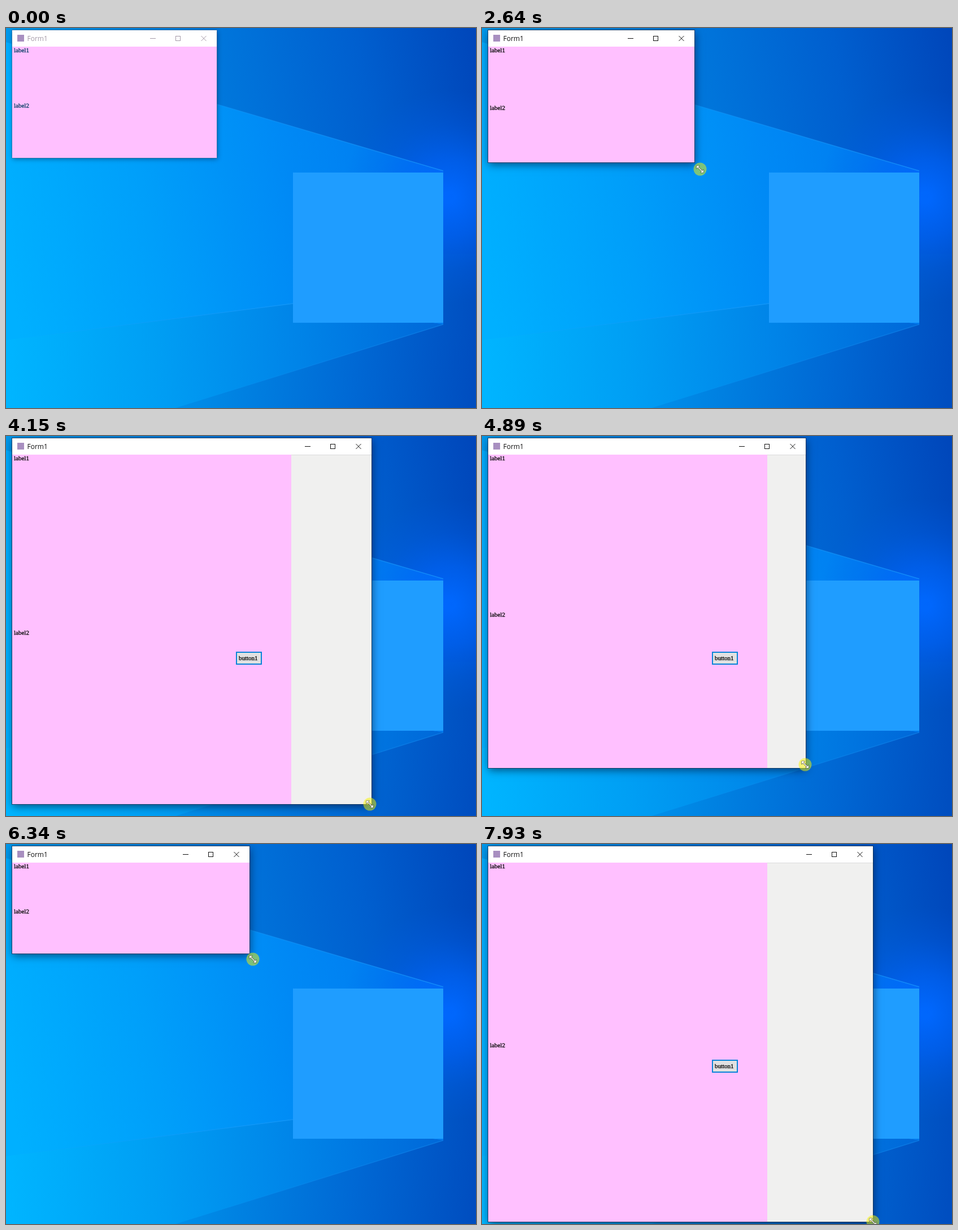
Animation, 832 px wide and 673 px high, one loop 8000 ms. Source, as an HTML page with a canvas:

```html
<!DOCTYPE html>
<html lang="en">
<head>
<meta charset="utf-8">
<title>Form1</title>
<style>
html, body { margin: 0; width: 100%; height: 100%; overflow: hidden; background: #0083e6; }
canvas { display: block; }
</style>
</head>
<body>
<canvas id="stage" width="832" height="673"></canvas>
<script>
const W = 832, H = 673, LOOP = 8000;
const STEP = 68.33, FIRST = 178;      // screen refresh interval and its phase
const ACTIVATE = 22, GRAB = 35;       // in refresh steps
const LEAD = .3;                      // how far the pointer runs ahead of the form
const LEFT = 11, TOP = 4, CLIENT = 33, PANEL_RIGHT = 505;
const ctx = document.getElementById('stage').getContext('2d');

// turning points of the dragged corner: step, right, bottom
const corners = [
  [35, 373, 230], [36, 376, 238], [44, 676, 590], [48.5, 738, 657], [58, 647, 652],
  [64, 600, 657], [76, 521, 415], [88, 428, 186], [90, 431, 194], [100, 679, 592],
  [113, 692, 669]
];

const clamp = (v, lo, hi) => Math.min(hi, Math.max(lo, v));

function slope(i, axis) {
  const a = corners[i - 1], b = corners[i + 1];
  return a && b ? (b[axis] - a[axis]) / (b[0] - a[0]) : 0;
}

// smooth curve through the turning points
function cornerAt(step) {
  const last = corners.length - 1;
  const s = clamp(step, corners[0][0], corners[last][0]);
  const i = clamp(corners.findIndex(k => k[0] >= s) - 1, 0, last - 1);
  const a = corners[i], b = corners[i + 1], h = b[0] - a[0], u = (s - a[0]) / h;
  return [1, 2].map(axis => Math.round(
    a[axis] + (b[axis] - a[axis]) * u * u * (3 - 2 * u) +
    h * u * (1 - u) * (slope(i, axis) * (1 - u) - slope(i + 1, axis) * u)));
}

function pointerAt(step) {
  if (step >= GRAB) return cornerAt(step + LEAD);
  const enter = clamp(step / 4, 0, 1);
  const reach = clamp((step - 6) / 8, 0, 1);
  return [748 - 407 * enter + 34 * reach, 668 - 326 * enter - 104 * reach].map(Math.round);
}

function polygon(c, points, fill) {
  c.beginPath();
  points.forEach(([x, y]) => c.lineTo(x, y));
  c.closePath();
  c.fillStyle = fill;
  c.fill();
}

function line(c, x0, y0, x1, y1, color, width = 1) {
  c.beginPath();
  c.moveTo(x0, y0);
  c.lineTo(x1, y1);
  c.strokeStyle = color;
  c.lineWidth = width;
  c.stroke();
}

function spread(g, colors) {
  colors.forEach((color, i) => g.addColorStop(i / (colors.length - 1), color));
  return g;
}

const gradient = (c, x0, y0, x1, y1, ...colors) =>
  spread(c.createLinearGradient(x0, y0, x1, y1), colors);

function makeWallpaper() {
  const canvas = document.createElement('canvas');
  canvas.width = W;
  canvas.height = H;
  const c = canvas.getContext('2d');
  c.fillStyle = gradient(c, 0, 130, W, 0, '#009aec', '#0087e2', '#0073da', '#005fcf', '#0046ba');
  c.fillRect(0, 0, W, H);
  polygon(c, [[0, H], [0, 400], [774, 400], [W, 400], [W, H]],
    gradient(c, 0, 500, W, 560, '#00b6fe', '#009df2', '#0082e2', '#0068d4', '#004ec0'));

  // light fans
  polygon(c, [[0, 25], [774, 253], [774, 525], [508, 488], [0, 553]],
    gradient(c, 0, 420, 774, 280, '#00b0ff', '#009ffa', '#0089f5', '#0078ee'));
  polygon(c, [[0, 553], [508, 488], [774, 525], [300, H], [0, H]],
    gradient(c, 0, 560, 774, 540, '#00b5ff', '#009ff4', '#0084e8', '#0068d9'));

  c.fillStyle = spread(c.createRadialGradient(785, 300, 10, 785, 300, 190),
    ['rgba(0,104,255,.95)', 'rgba(0,100,250,.65)', 'rgba(0,96,240,.25)', 'rgba(0,90,230,0)']);
  c.fillRect(590, 105, 242, 390);

  const beam = (x0, y0, x1, y1, alpha) =>
    line(c, x0, y0, x1, y1,
      gradient(c, x0, y0, x1, y1, 'rgba(30,160,255,0)', `rgba(30,160,255,${alpha})`), 1.5);
  beam(0, 25, 774, 253, .6);
  beam(0, 553, 508, 488, .6);
  beam(300, H, 774, 525, .35);

  c.fillStyle = '#1f9dff';
  c.fillRect(508, 256, 266, 266);
  return canvas;
}
const wallpaper = makeWallpaper();

function text(string, x, y, font, color, weight = 0) {
  ctx.font = font;
  ctx.fillStyle = color;
  ctx.fillText(string, x, y);
  if (weight) {
    ctx.strokeStyle = color;
    ctx.lineWidth = weight;
    ctx.strokeText(string, x, y);
  }
}

const label = (string, x, y, color) =>
  text(string, x, y, '11px "Liberation Serif", serif', color, .35);

function drawTitleBar(right, color) {
  ctx.fillStyle = '#fff';
  ctx.fillRect(LEFT, TOP, right - LEFT, CLIENT - TOP);
  ctx.fillStyle = '#a88fc0';
  ctx.fillRect(20, 12, 12, 12);
  text('Form1', 37.5, 22.5, '12px "Open Sans", sans-serif', color);
  line(ctx, right - 118, 18.5, right - 108, 18.5, color);
  ctx.strokeRect(right - 72.5, 14.5, 8, 8);
  const x = right - 23;
  line(ctx, x - 4.5, 14, x + 4.5, 23, color);
  line(ctx, x + 4.5, 14, x - 4.5, 23, color);
}

function drawShadow(w, h, active) {
  ctx.save();
  ctx.shadowColor = `rgba(0,15,40,${active ? .6 : .45})`;
  ctx.shadowBlur = active ? 14 : 8;
  ctx.shadowOffsetX = 1;
  ctx.shadowOffsetY = active ? 4 : 2;
  ctx.fillStyle = '#f0f0ef';
  ctx.fillRect(LEFT, TOP, w, h);
  ctx.restore();
}

function drawButton() {
  ctx.fillStyle = '#e1e1e1';
  ctx.fillRect(407, 382, 46, 23);
  ctx.strokeStyle = '#0a84d8';
  ctx.lineWidth = 2;
  ctx.strokeRect(408, 383, 44, 21);
  label('button1', 412, 397, '#111');
}

function drawForm(right, bottom, active) {
  const w = right - LEFT, h = bottom - TOP;
  const ink = active ? '#111' : '#0b3f68';
  drawShadow(w, h, active);

  ctx.save();
  ctx.beginPath();
  ctx.rect(LEFT, TOP, w, h);
  ctx.clip();
  drawTitleBar(right, active ? '#111' : '#a49aa8');
  ctx.fillStyle = '#ffc0ff';
  ctx.fillRect(LEFT, CLIENT, PANEL_RIGHT - LEFT, h);
  if (right > PANEL_RIGHT) line(ctx, PANEL_RIGHT, CLIENT + .5, right, CLIENT + .5, '#dcdcdc');
  label('label1', 14, 43, ink);
  label('label2', 14, Math.floor((bottom + CLIENT) / 2 + 9.5), ink);
  drawButton();
  ctx.restore();

  ctx.strokeStyle = active ? 'rgba(20,50,85,.8)' : 'rgba(90,110,150,.5)';
  ctx.lineWidth = 1;
  ctx.strokeRect(LEFT - .5, TOP - .5, w + 1, h + 1);
}

function drawPointer(x, y, resizing) {
  ctx.beginPath();
  ctx.arc(x, y, 11.5, 0, Math.PI * 2);
  ctx.fillStyle = 'rgba(250,245,0,.5)';
  ctx.fill();

  // half of the double arrow; the other half is its point reflection
  const half = [[-3, -4], [4, 3], [6, 1], [6, 6], [1, 6]];
  const shape = resizing
    ? [...half, ...half.map(([px, py]) => [-px, -py])]
    : [[0, 0], [0, 13], [3, 10], [5, 14], [7, 13], [5, 9], [9, 9]];
  ctx.save();
  ctx.translate(x, y);
  ctx.lineJoin = 'round';
  ctx.beginPath();
  shape.forEach(([px, py]) => ctx.lineTo(px, py));
  ctx.closePath();
  ctx.strokeStyle = '#4a4a30';
  ctx.lineWidth = 1.2;
  ctx.stroke();
  ctx.fillStyle = '#fff';
  ctx.fill();
  ctx.restore();
}

function draw(time) {
  const step = Math.floor((time - FIRST) / STEP);
  ctx.drawImage(wallpaper, 0, 0);
  drawForm(...cornerAt(step), step >= ACTIVATE);
  if (step >= 0) drawPointer(...pointerAt(step), step >= 14);
}

const start = performance.now();
function frame() {
  draw((performance.now() - start) % LOOP);
  requestAnimationFrame(frame);
}
frame();
</script>
</body>
</html>
```
